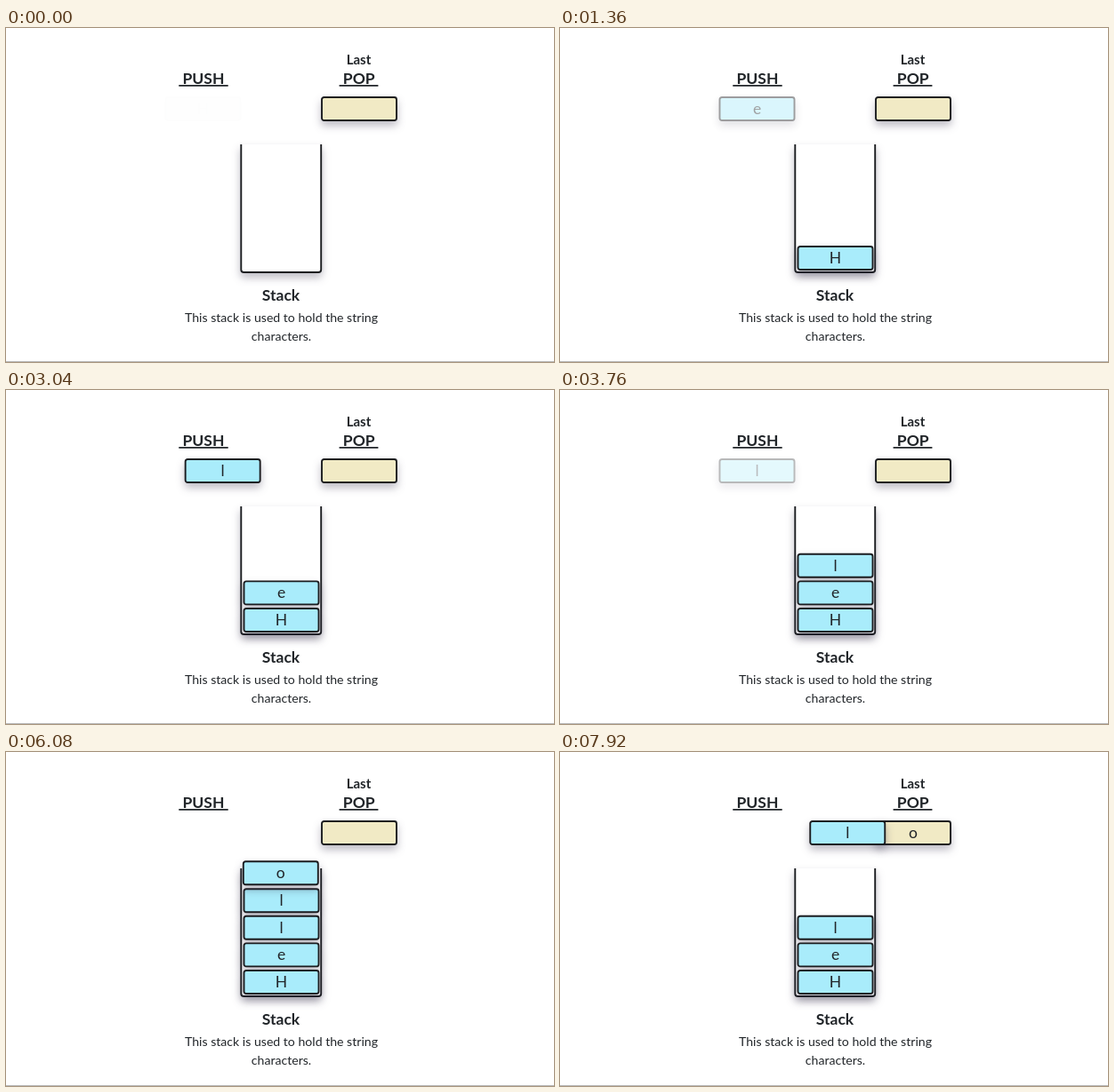
Recreate the animation shown at these times as an HTML page. Size 616 by 376 pixels, loop 8 s.

```html
<!DOCTYPE html>
<html lang="en">
<head>
<meta charset="utf-8">
<title>Stack</title>
<style>
  html, body { margin: 0; width: 100%; height: 100%; overflow: hidden; background: #fff; }
  svg { display: block; width: 616px; height: 376px; }
  text { font: 17.5px Lato, sans-serif; fill: #212529; text-anchor: middle; }
  .title { font-weight: 700; }
  .line { text-decoration: underline; }
  .last { font-weight: 700; font-size: 15px; }
  .note { font-size: 14.1px; }
  rect, path { stroke: #1b1d20; stroke-width: 1.9; }
  .shadow { filter: drop-shadow(0 5px 5px rgba(50, 45, 70, .32)); }
</style>
</head>
<body>
<svg viewBox="0 0 616 376">
  <g id="head">
    <text class="title line" x="222" y="63">&nbsp;PUSH&nbsp;</text>
    <text class="last" x="396.5" y="41">Last</text>
    <text class="title line" x="396.5" y="63">&nbsp;POP&nbsp;</text>
    <g transform="translate(354 77)">
      <rect class="shadow" x="1" y="1" width="84" height="26" rx="2.5" fill="#f1eac5"/>
      <text id="popped" x="43" y="20"></text>
    </g>
  </g>
  <path id="box" class="shadow" fill="#fff"/>
  <g id="foot">
    <text class="title" x="309" y="307">Stack</text>
    <text class="note" x="309.5" y="331">This stack is used to hold the string</text>
    <text class="note" x="309.5" y="352">characters.</text>
  </g>
  <g id="blocks"></g>
  <path d="M0 375.5H616" style="stroke:#b9b9b9;stroke-width:1"/>
</svg>
<script>
const $ = id => document.getElementById(id);
const word = 'Hello', LOOP = 8000;
const PUSH = 1220, POP = 1110, POP_START = 6112;
const PUSH_X = 178.5, STACK_X = 266.5, POP_X = 354, TOP = 77;
const GROW = 19.8, LIFT = -0.6;

const slotY = i => 245 - 30.6 * i;
const mix = (a, b, k) => a + (b - a) * k;
const span = (t, a, b) => Math.min(1, Math.max(0, (t - a) / (b - a)));
const ease = (t, a, b) => (1 - Math.cos(Math.PI * span(t, a, b))) / 2;

function makeBlock(letter) {
  const g = document.createElementNS('http://www.w3.org/2000/svg', 'g');
  g.innerHTML = `<rect class="shadow" x="1" y="1" width="84" height="26" rx="2.5" fill="#a9ecfb"/>
    <text x="43" y="20">${letter}</text>`;
  $('blocks').append(g);
  return g;
}

function place(g, x, y, opacity = 1) {
  g.setAttribute('transform', `translate(${x} ${y})`);
  g.setAttribute('opacity', opacity);
}

// upper blocks come first so that lower ones cover their shadows
const resting = [3, 2, 1, 0].map(i => makeBlock(word[i])).reverse();
const flyer = makeBlock('');
const flyerText = flyer.querySelector('text');

function draw(t) {
  const popping = t >= POP_START;
  const n = Math.floor(popping ? (t - POP_START) / POP : t / PUSH);
  const item = popping ? 4 - n : Math.min(n, 4);
  const p = popping ? t - POP_START - n * POP : t - item * PUSH;
  const full = popping && n === 0;
  const grow = full ? GROW : 0, lift = full ? LIFT : 0;

  $('head').setAttribute('transform', `translate(0 ${lift})`);
  $('foot').setAttribute('transform', `translate(0 ${grow})`);
  $('box').setAttribute('d', `M264.3 ${131 + lift}V${272 + grow}q0 3 3 3H351.2q3 0 3-3V${131 + lift}`);
  $('popped').textContent = popping && n > 0 ? word[item + 1] : '';

  resting.forEach((g, i) => place(g, STACK_X, slotY(i) + grow, i < item ? 1 : 0));

  flyerText.textContent = word[item];
  if (popping) {
    place(flyer,
      mix(STACK_X, POP_X, ease(p, POP / 2, POP)),
      mix(slotY(item) + grow, TOP + lift, ease(p, 0, POP / 2)));
  } else {
    place(flyer,
      mix(PUSH_X, STACK_X - 0.7, ease(p, 480, 840)),
      mix(TOP, slotY(item), ease(p, 900, PUSH)),
      span(p, 0, 330));
  }
}

const start = performance.now();
function tick() {
  draw((performance.now() - start) % LOOP);
  requestAnimationFrame(tick);
}
tick();
</script>
</body>
</html>
```
